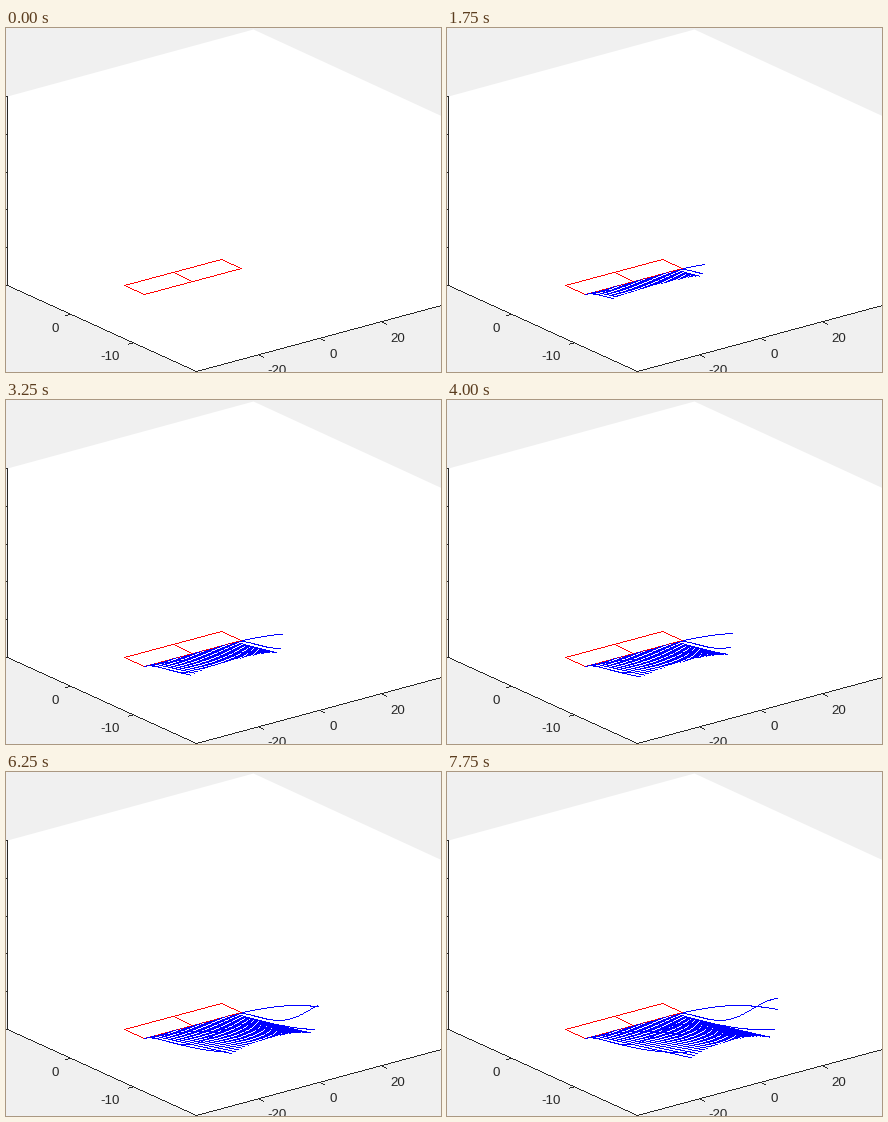
A matplotlib script for the animation above (8000 ms loop, 435x344 px).

```python
import numpy as np
import matplotlib.pyplot as plt
from matplotlib.animation import FuncAnimation

W, H, DPI = 435, 344, 64
FRAMES, INTERVAL = 32, 250
INK, RED, BLUE = (38, 38, 38), (255, 0, 0), (0, 0, 255)

fig = plt.figure(figsize=(W / DPI, H / DPI), dpi=DPI, facecolor="#f0f0f0")
ax = fig.add_axes([0, 0, 1, 1])
ax.axis("off")


def stroke(layer, points, color):
    """Paint a hard-edged line, one pixel wide, into an RGBA layer."""
    points = np.asarray(points, float)
    for a, b in zip(points[:-1], points[1:]):
        n = int(np.ceil(np.abs(b - a).max())) + 1
        x, y = np.floor(np.linspace(a, b, n) + 0.5).astype(int).T
        inside = (x >= 0) & (x < W) & (y >= 0) & (y < H)
        layer[y[inside], x[inside]] = (*color, 255)


def label(x, y, text):
    ax.text(x, y, text, color="#262626", ha="center", va="baseline",
            family="Liberation Sans", size=13.33 * 72 / DPI)


# Axes box with ticks
ax.fill([1, 1, 247, 436, 436, 190], [257, 68, 1, 88, 277, 343.5],
        color="white", lw=0, zorder=0)
base = np.zeros((H, W, 4), np.uint8)
stroke(base, [(1, 68), (1, 257), (190, 343), (436, 276.7)], INK)
for i in range(6):
    y = 68 + 37.8 * i
    stroke(base, [(0, y), (1, y)], INK)
for i in (1, 2):
    x, y = 1 + 63 * i, 257 + 28.6 * i
    stroke(base, [(x, y), (x - 5, y + 1.5)], INK)
for i in (1, 2, 3):
    x, y = 190 + 61.7 * i, 343 - 16.6 * i
    stroke(base, [(x, y), (x + 5, y + 2.5)], INK)

label(48.5, 303, "0")
label(104, 332, "-10")
label(270, 345.5, "-20")
label(327, 330, "0")
label(391, 313, "20")

# Wing
stroke(base, [(138, 266), (118, 257), (215, 231), (235, 240), (138, 266)], RED)
stroke(base, [(167, 244), (186, 253)], RED)

LINES = 31
STEPS = np.arange(FRAMES)
T = STEPS / STEPS[-1]

# Outermost wake lines roll up: vertical drift and inward speed, tip first
ROLL_UP = [
    (-7 * np.sin(2.7 * T), 0.06),
    (15 * T ** 0.75 * np.sin(4.76 * T), -0.05),
    (15.5 * np.sin(1.75 * T), -0.05),
]


def wake_line(i):
    """Path shed from the i-th point of the trailing edge."""
    s = 2 * i / (LINES - 1) - 1
    k = min(i, LINES - 1 - i)
    if k < len(ROLL_UP):
        drift, inward = ROLL_UP[k]
    else:
        drift, inward = STEPS * (0.48 + 0.4 * abs(s) ** 2.5), 0
    x = 187 + 49 * s + (3.1 - np.sign(s) * inward) * STEPS
    return np.column_stack([x, 253 - 13 * s + drift])


paths = [wake_line(i) for i in range(LINES)]
view = ax.imshow(base, extent=(-0.5, W - 0.5, H - 0.5, -0.5), aspect="auto",
                 interpolation="nearest", zorder=2)
ax.set_xlim(-0.5, W - 0.5)
ax.set_ylim(H - 0.5, -0.5)


def update(n):
    layer = base.copy()
    if n:
        for path in paths:
            stroke(layer, path[:n + 1], BLUE)
    view.set_data(layer)
    return [view]


anim = FuncAnimation(fig, update, frames=FRAMES, interval=INTERVAL,
                     repeat=True, repeat_delay=0, blit=False)
plt.show()
```
